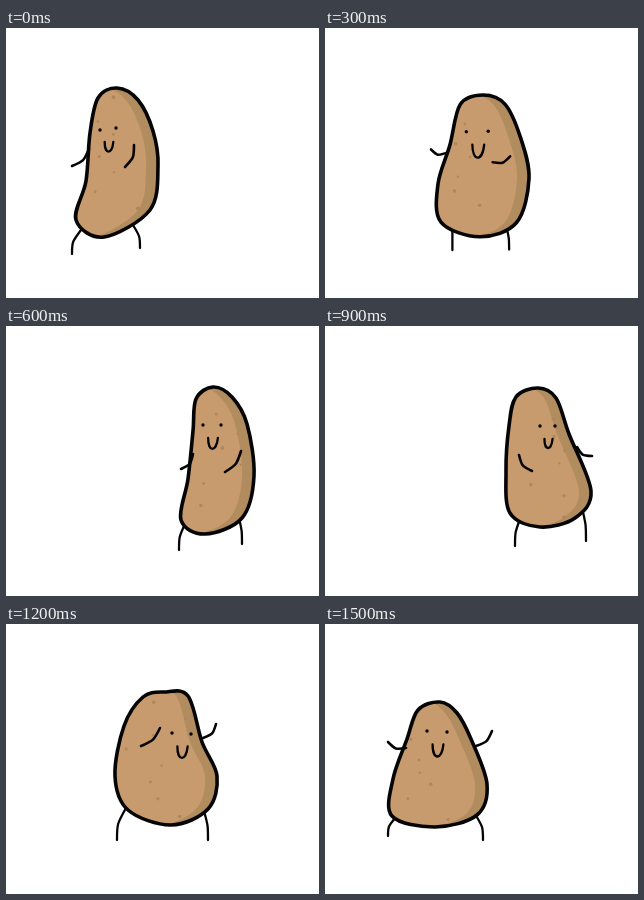
Recreate the animation shown at these times as an HTML page with a canvas. Size 313x270 px, loop 1650 ms.

```html
<!DOCTYPE html>
<html lang="en">
<head>
<meta charset="utf-8">
<title>Dancing potato</title>
<style>
html, body { margin: 0; width: 100%; height: 100%; overflow: hidden; background: #fff; }
canvas { display: block; }
</style>
</head>
<body>
<canvas id="stage" width="313" height="270"></canvas>
<script>
const ctx = document.getElementById('stage').getContext('2d');
const STEP = 150, INK = '#050505', SKIN = '#c79b6d', SHADE = '#b08c5e', SPOT = '#b0865b';

// Key points: body clockwise from the top, two eyes, two arms, two legs (root, foot)
const pose = (...rows) => rows.join(' ').split(' ').map(p => p.split(',').map(Number));

const leanLeft = pose(
  '111,60 132,72 147,103 152,138 144,182 98,209 70,192 80,153 84,105 92,70',
  '94,102 110,100', '66,138 83,121 119,139 128,117', '75,202 66,226 127,197 134,220');
const stepRight = pose(
  '137,66 157,76 173,111 183,150 172,194 137,209 98,193 97,160 107,122 115,77',
  '121,103 143,102', '90,122 105,124 147,133 162,127', '104,200 105,222 160,200 163,221');
const round = pose(
  '183,64 207,73 222,106 229,150 215,196 176,210 137,196 132,152 146,110 159,72',
  '165,102 187,102', '125,119 141,124 192,134 212,128', '154,205 153,224 207,200 209,224');
const leanRight = pose(
  '207,61 226,71 241,98 248,150 236,192 199,208 175,194 182,153 187,105 190,73',
  '197,99 215,99', '175,143 187,128 219,146 235,125', '179,198 173,224 233,192 236,218');
const turn = pose(
  '213,62 231,72 244,108 266,165 250,192 215,201 185,187 181,145 184,100 191,71',
  '215,100 230,100', '194,129 207,145 252,121 267,130', '195,193 190,220 257,182 261,215');
const stepLeft = pose(
  '158,68 182,72 196,118 211,152 202,185 165,201 122,186 109,152 118,102 137,73',
  '166,109 185,110', '135,122 154,104 197,114 210,100', '120,184 111,216 198,187 202,216');
const armsUp = pose(
  '115,78 132,89 146,115 162,160 152,191 110,203 67,192 68,155 82,115 93,86',
  '102,107 122,108', '63,118 81,124 151,122 167,107', '71,193 63,212 150,190 158,216');

// Halfway pose of a and b, stretched to the given ink box
function between(a, b, left, top, right, bottom) {
  const mid = a.map(([x, y], i) => [(x + b[i][0]) / 2, (y + b[i][1]) / 2]);
  const fit = (axis, lo, hi) => {
    const all = mid.map(p => p[axis]), min = Math.min(...all), max = Math.max(...all);
    return p => lo + 2 + (p[axis] - min) * (hi - lo - 4) / (max - min);
  };
  const fx = fit(0, left, right), fy = fit(1, top, bottom);
  return mid.map(p => [fx(p), fy(p)]);
}

const poses = [
  leanLeft,
  stepRight,
  between(stepRight, round, 104, 65, 206, 224),
  round,
  leanRight,
  between(leanRight, turn, 164, 60, 268, 222),
  turn,
  between(turn, stepLeft, 137, 60, 249, 218),
  stepLeft,
  between(stepLeft, armsUp, 70, 62, 165, 228),
  armsUp
];

// Smooth closed outline through points
function outline(pts) {
  const path = new Path2D(), n = pts.length;
  path.moveTo(...pts[0]);
  pts.forEach((b, i) => {
    const a = pts[(i + n - 1) % n], c = pts[(i + 1) % n], d = pts[(i + 2) % n];
    path.bezierCurveTo(b[0] + (c[0] - a[0]) / 6, b[1] + (c[1] - a[1]) / 6,
      c[0] - (d[0] - b[0]) / 6, c[1] - (d[1] - b[1]) / 6, c[0], c[1]);
  });
  path.closePath();
  return path;
}

function dot(x, y, r, color) {
  ctx.fillStyle = color;
  ctx.beginPath();
  ctx.arc(x, y, r, 0, 2 * Math.PI);
  ctx.fill();
}

function stroke(width, a, c, b, c2 = c) {
  ctx.lineWidth = width;
  ctx.beginPath();
  ctx.moveTo(...a);
  ctx.bezierCurveTo(...c, ...c2, ...b);
  ctx.stroke();
}

// Arms sag sideways from the straight line, always downwards
function arm(a, b) {
  const dx = b[0] - a[0], dy = b[1] - a[1], sag = 4.8 / Math.hypot(dx, dy);
  stroke(2.6, a, [(a[0] + b[0]) / 2 - dy * sag, (a[1] + b[1]) / 2 + dx * sag], b);
}

// Legs straighten towards the foot
function leg(root, foot) {
  stroke(2.3, root, [foot[0], (root[1] + foot[1]) / 2], foot);
}

function face([x1, y1], [x2, y2]) {
  const gap = x2 - x1, x = (x1 + x2) / 2 + 1, y = (y1 + y2) / 2 + 13;
  const w = gap * 0.27, h = gap * 0.8;
  dot(x1, y1, 1.7, INK);
  dot(x2, y2, 1.7, INK);
  stroke(2.3, [x - w, y], [x - w, y + h], [x + w, y], [x + w * 0.7, y + h]);
}

function spots(body, seed) {
  const rand = () => (seed = (seed * 16807) % 2147483647) / 2147483647;
  const [top, , , right, , bottom, , left] = body;
  for (let i = 0; i < 8; i++) {
    const y = top[1] + (bottom[1] - top[1]) * (i + 0.5 + rand() * 0.5) / 8.5;
    dot(left[0] + (right[0] - left[0]) * (0.1 + rand() * 0.75), y, 1.2 + rand() * 0.7, SPOT);
  }
}

function draw(index) {
  const p = poses[index], points = p.slice(0, 10), body = outline(points);
  ctx.fillStyle = '#fff';
  ctx.fillRect(0, 0, 313, 270);
  ctx.strokeStyle = INK;
  ctx.lineCap = ctx.lineJoin = 'round';
  leg(p[16], p[17]);
  leg(p[18], p[19]);

  // The shifted light copy leaves a shaded strip on the right
  ctx.save();
  ctx.clip(body);
  ctx.fillStyle = SHADE;
  ctx.fill(body);
  ctx.fillStyle = SKIN;
  ctx.fill(outline(points.map(([x, y]) => [x - 12, y])));
  spots(points, 4321 * (index + 1));
  ctx.restore();

  ctx.lineWidth = 3.6;
  ctx.stroke(body);
  face(p[10], p[11]);
  arm(p[12], p[13]);
  arm(p[14], p[15]);
}

function tick() {
  draw(Math.floor(performance.now() / STEP) % poses.length);
  requestAnimationFrame(tick);
}
tick();
</script>
</body>
</html>
```
